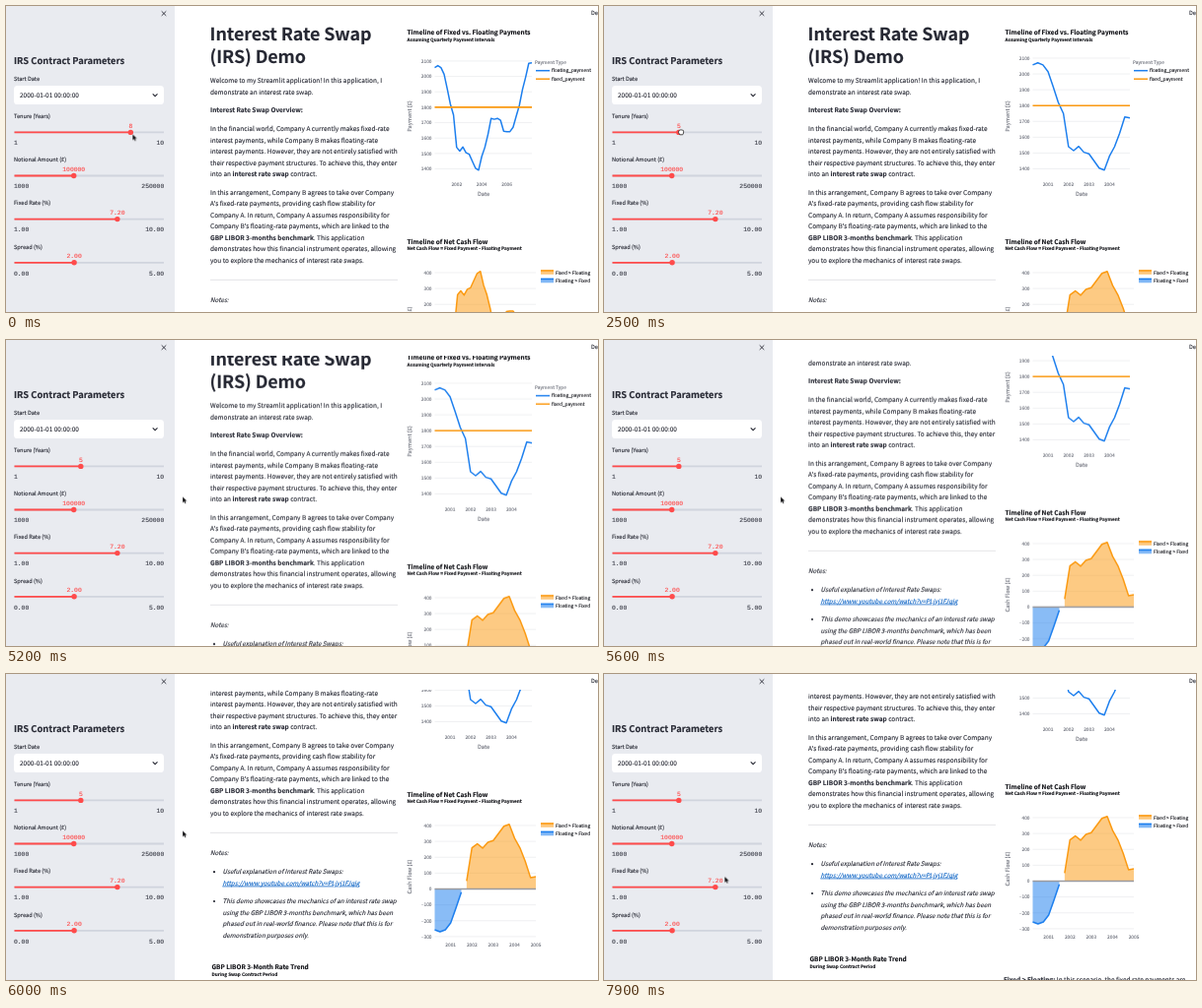
An HTML page for the animation above (8 s loop, 600 px wide and 311 px high).

```html
<!DOCTYPE html>
<html lang="en">
<head>
<meta charset="utf-8">
<title>Interest Rate Swap Demo</title>
<style>
html, body { margin: 0; width: 600px; height: 311px; overflow: hidden; background: #fff; }
svg { display: block; }
text {
  --ink: #262833;
  font-family: "Noto Sans CJK JP", "Noto Sans CJK SC", "Noto Sans CJK KR", "Noto Sans CJK", "Noto Sans", sans-serif;
  fill: var(--ink); stroke: var(--ink); stroke-width: .12px;
  text-rendering: geometricPrecision; white-space: pre;
}
.body { font-size: 6.49px; }
.note { font-size: 6.25px; font-style: italic; }
.label { font-size: 5.64px; }
.mono { font: 6.35px "Liberation Mono", monospace; --ink: #3a3c47; }
.tick { font-size: 4.83px; --ink: #6d707b; }
.axis { font-size: 5.64px; --ink: #6d707b; text-anchor: middle; }
.legend { font-size: 4.83px; --ink: #15161c; }
.title { font-size: 6.45px; --ink: #0c0d12; }
.sub { font-size: 4.7px; --ink: #0c0d12; }
.b, .title, .sub, .h1, .h2 { font-weight: 700; }
.h1 { font-size: 17.9px; letter-spacing: -.005em; }
.h2 { font-size: 9.35px; }
.end { text-anchor: end; }
.mid { text-anchor: middle; }
.red { --ink: #ff4b4b; }
.link { --ink: #0a62c4; text-decoration: underline; }
.line { fill: none; stroke-width: 1.5; stroke-linejoin: round; }
#page { animation: scroll 8s linear infinite; }
#mouse { animation: move 8s linear infinite; }
@keyframes scroll {
  0%, 55% { transform: translateY(0); }
  60% { transform: translateY(-2px); animation-timing-function: ease-in; }
  65% { transform: translateY(-9px); }
  70% { transform: translateY(-64px); }
  75% { transform: translateY(-117px); animation-timing-function: ease-out; }
  80%, 100% { transform: translateY(-125px); }
}
@keyframes move {
  0% { transform: translate(128.3px, 130.3px); }
  2.5% { transform: translate(127px, 127px); }
  8.75% { transform: translate(110px, 126px); }
  15%, 18.75% { transform: translate(94.5px, 126px); }
  22.5%, 35% { transform: translate(77px, 126px); }
  38.75%, 43.75% { transform: translate(100px, 135px); }
  47.5% { transform: translate(148.3px, 151px); animation-timing-function: ease-out; }
  53%, 91.25% { transform: translate(179px, 159.3px); animation-timing-function: ease-in-out; }
  98.75%, 100% { transform: translate(122.3px, 205.8px); }
}
</style>
</head>
<body>
<svg id="stage" width="600" height="311" viewBox="0 0 600 311"></svg>
<script>
const LOOP = 8000;
const BLUE = '#1d7fee', ORANGE = '#fb9a12', GRID = '#e5e6ea';
const LEFT = 434.5, ZERO = 335.5;

// Fixed minus floating payment, one value per quarter
const NET = [-257, -270, -257, -214, -120, -20, 50, 260, 285, 258, 295, 305, 350, 395, 408, 320,
  260, 175, 72, 78, 72, 85, 155, 158, 158, 130, 58, -12, -115, -195, -285, -288];

const esc = s => s.replace(/ > /g, ' &gt; ').replace(/\*(.+?)\*/g, '<tspan font-weight="700">$1</tspan>');
const text = (x, y, s, cls) => `<text x="${x}" y="${y}" class="${cls}">${esc(String(s))}</text>`;
const line = (x1, y1, x2, y2, color, w = .6) =>
  `<path d="M${x1} ${y1}L${x2} ${y2}" stroke="${color}" stroke-width="${w}"/>`;
const lines = (x, y, cls, list) => list.map((s, i) => text(x, y + i * 11.5, s, cls)).join('');
const side = (x, y, s) => `<text class="axis" transform="translate(${x} ${y}) rotate(-90)">${s}</text>`;
const path = pts => 'M' + pts.map(p => p.map(v => v.toFixed(2)).join(' ')).join('L');

const netY = v => ZERO - v * .1613;

function grid(from, to, y, right) {
  let out = '';
  for (let v = from; v <= to; v += 100) {
    out += line(LEFT, y(v), right, y(v), GRID) +
      text(431.5, y(v) + 1.8, String(v).replace('-', '–'), 'tick end');
  }
  return out;
}

function years(first, last, step, x, y) {
  let out = '';
  for (let yr = first; yr <= last; yr += step) out += text(x(yr), y, yr, 'tick mid');
  return out;
}

function chart(tenure) {
  const data = NET.slice(0, tenure * 4), n = data.length - 1;
  const x1 = k => LEFT + k * 98.5 / n, x2 = k => LEFT + k * 102.5 / n;
  const year = f => yr => f((yr - 2000.25) * 4);
  const step = tenure > 6 ? 2 : 1, first = 2000 + step;
  // The payment axis spans the data of the chosen tenure
  const low = Math.min(...data), span = Math.max(...data) - low;
  const payY = v => 57.8 + (1800 - v - low) * 109 / span;
  const runs = [];
  data.forEach((v, k) => {
    if (!k || v > 0 !== data[k - 1] > 0) runs.push([]);
    runs[runs.length - 1].push(k);
  });
  const areas = runs.map(run => {
    const color = data[run[0]] > 0 ? ORANGE : BLUE;
    const top = path(run.map(k => [x2(k), netY(data[k])]));
    return `<path d="${top}L${x2(run[run.length - 1])} ${ZERO}L${x2(run[0])} ${ZERO}Z" fill="${color}" fill-opacity=".52"/>
      <path class="line" d="${top}" stroke="${color}"/>`;
  }).join('');
  return `<g class="chart">
    ${grid(1400, 2100, payY, 533)}
    <path class="line" d="${path(data.map((v, k) => [x1(k), payY(1800 - v)]))}" stroke="${BLUE}"/>
    ${line(LEFT, payY(1800), 533, payY(1800), ORANGE, 1.6)}
    ${years(first, 1999 + tenure, step, year(x1), 183)}
    ${areas}
    ${line(LEFT, ZERO, 537, ZERO, '#9a9a9f', 1.7)}
    ${years(first, 2000 + tenure, step, year(x2), 394)}
  </g>`;
}

const swatch = (y, color) =>
  `<rect x="542" y="${y}" width="13" height="4.6" fill="${color}" fill-opacity=".55"/>` +
  line(542, y + .8, 555, y + .8, color, 1.5);

const story = [
  text(206.6, 34.6, 'Interest Rate Swap', 'h1'),
  text(206.6, 58.4, '(IRS) Demo', 'h1'),
  lines(207, 78.2, 'body', [
    'Welcome to my Streamlit application! In this application, I',
    'demonstrate an interest rate swap.']),
  text(207, 108.4, 'Interest Rate Swap Overview:', 'body b'),
  lines(207, 127, 'body', [
    'In the financial world, Company A currently makes fixed-rate',
    'interest payments, while Company B makes floating-rate',
    'interest payments. However, they are not entirely satisfied with',
    'their respective payment structures. To achieve this, they enter',
    'into an *interest rate swap* contract.']),
  lines(207, 191.6, 'body', [
    'In this arrangement, Company B agrees to take over Company',
    "A's fixed-rate payments, providing cash flow stability for",
    'Company A. In return, Company A assumes responsibility for',
    "Company B's floating-rate payments, which are linked to the",
    '*GBP LIBOR 3-months benchmark*. This application',
    'demonstrates how this financial instrument operates, allowing',
    'you to explore the mechanics of interest rate swaps.']),
  line(207, 278.4, 397, 278.4, '#d9dadf', .7),
  text(207, 301.3, 'Notes:', 'note'),
  '<circle cx="211" cy="318.2" r="1.1" fill="#262833"/><circle cx="211" cy="348" r="1.1" fill="#262833"/>',
  text(219.5, 320.3, 'Useful explanation of Interest Rate Swaps:', 'note'),
  text(219.5, 331.6, 'https://www.youtube.com/watch?v=PLjvj1FJqig', 'note link'),
  lines(219.5, 350.2, 'note', [
    'This demo showcases the mechanics of an interest rate swap',
    'using the GBP LIBOR 3-months benchmark, which has been',
    'phased out in real-world finance. Please note that this is for',
    'demonstration purposes only.']),
  text(208.5, 417.3, 'GBP LIBOR 3-Month Rate Trend', 'title'),
  text(208.5, 423.7, 'During Swap Contract Period', 'sub')
].join('');

const frames = [
  text(406.5, 29.4, 'Timeline of Fixed vs. Floating Payments', 'title'),
  text(406.5, 35.9, 'Assuming Quarterly Payment Intervals', 'sub'),
  side(411, 112, 'Payment (£)'),
  text(484, 193.4, 'Date', 'axis'),
  text(536, 59, 'Payment Type', 'tick'),
  line(537, 65.7, 551, 65.7, BLUE, 1.5),
  text(553, 67.4, 'floating_payment', 'legend'),
  line(537, 74.2, 551, 74.2, ORANGE, 1.5),
  text(553, 75.9, 'fixed_payment', 'legend'),
  text(406.5, 241.6, 'Timeline of Net Cash Flow', 'title'),
  text(406.5, 248, 'Net Cash Flow = Fixed Payment - Floating Payment', 'sub'),
  grid(-300, 400, netY, 537),
  side(411, 323, 'Cash Flow (£)'),
  swatch(268.2, ORANGE),
  text(557, 272.6, 'Fixed > Floating', 'legend'),
  swatch(276.7, BLUE),
  text(557, 281, 'Floating > Fixed', 'legend'),
  text(405, 438.2, '*Fixed > Floating:* In this scenario, the fixed rate payments are', 'body')
].join('');

const track = y => line(8.5, y, 160, y, '#d0d4de', 1.8);
const thumb = (part, y, value) => {
  const x = 8.5 + part * 151.5;
  return line(8.5, y, x, y, '#ff4b4b', 1.8) +
    `<circle cx="${x}" cy="${y}" r="2.7" fill="#ff4b4b"/>` + text(x, y - 4.6, value, 'mono red mid');
};
const slider = (y, label, min, max, knob) =>
  text(8, y - 14.2, label, 'label') + track(y) + knob +
  text(8, y + 12.8, min, 'mono') + text(160.2, y + 12.8, max, 'mono end');

const tenures = [8, 7, 6, 5];
const sidebar = [
  '<rect width="171" height="311" fill="#e9ebf0"/>',
  '<path d="M157.7 5.3l4.6 4.6m0-4.6l-4.6 4.6" stroke="#262833" stroke-width=".9"/>',
  text(8, 59.2, 'IRS Contract Parameters', 'h2'),
  text(8, 76.2, 'Start Date', 'label'),
  '<rect x="8" y="81" width="152" height="19" rx="3.6" fill="#fff"/>',
  text(14, 92.9, '2000-01-01 00:00:00', 'body'),
  '<path d="M148.7 89.4l2.4 2.3l2.4-2.3" fill="none" stroke="#262833" stroke-width="1.1"/>',
  slider(128.4, 'Tenure (Years)', '1', '10',
    tenures.map(n => `<g class="knob">${thumb((n - 1) / 9, 128.4, n)}</g>`).join('')),
  slider(172.5, 'Notional Amount (£)', '1000', '250000', thumb(99 / 249, 172.5, '100000')),
  slider(216.6, 'Fixed Rate (%)', '1.00', '10.00', thumb(6.2 / 9, 216.6, '7.20')),
  slider(260.8, 'Spread (%)', '0.00', '5.00', thumb(.4, 260.8, '2.00'))
].join('');

const mouse = `<g id="mouse">
  <path class="arrow" d="M0 0V6.2L1.5 4.9L2.4 7L3.5 6.6L2.7 4.4H4.6Z" fill="#0a0a0c" stroke="#fff" stroke-width=".3"/>
  <path class="hand" d="M-1.6 2.2L-.8 .4Q.2-.5 1 .1Q1.9-.4 2.5.2Q3.6.1 3.6 1.2V3L2.8 4.8H-.3Z" fill="#fff" stroke="#222" stroke-width=".8"/>
</g>`;

const stage = document.getElementById('stage');
stage.innerHTML = `<g id="page">${story}${frames}${tenures.map(chart).join('')}</g>
  <rect x="171" width="429" height="16" fill="#fff"/>
  ${text(593, 9.2, 'Deploy', 'label')}${sidebar}${mouse}`;

// Hold each [time, opacity] until the next one
const blink = (el, steps) => el.animate(
  steps.map(([ms, opacity]) => ({ offset: ms / LOOP, opacity, easing: 'step-end' })),
  { duration: LOOP, iterations: Infinity });

// Show an element only between two times of the loop
function show(el, from, to) {
  const steps = [[0, from ? 0 : 1]];
  if (from) steps.push([from, 1]);
  if (to < LOOP) steps.push([to, 0]);
  steps.push([LOOP, to < LOOP ? 0 : 1]);
  blink(el, steps);
}
const sequence = (cls, times) =>
  stage.querySelectorAll(cls).forEach((el, i) => show(el, times[i], times[i + 1]));

sequence('.knob', [0, 300, 900, 1700, LOOP]);
sequence('.chart', [0, 800, 1900, 2400, LOOP]);
show(stage.querySelector('.hand'), 200, 2800);
blink(stage.querySelector('.arrow'), [[0, 1], [200, 0], [2800, 1], [LOOP, 1]]);
</script>
</body>
</html>
```
